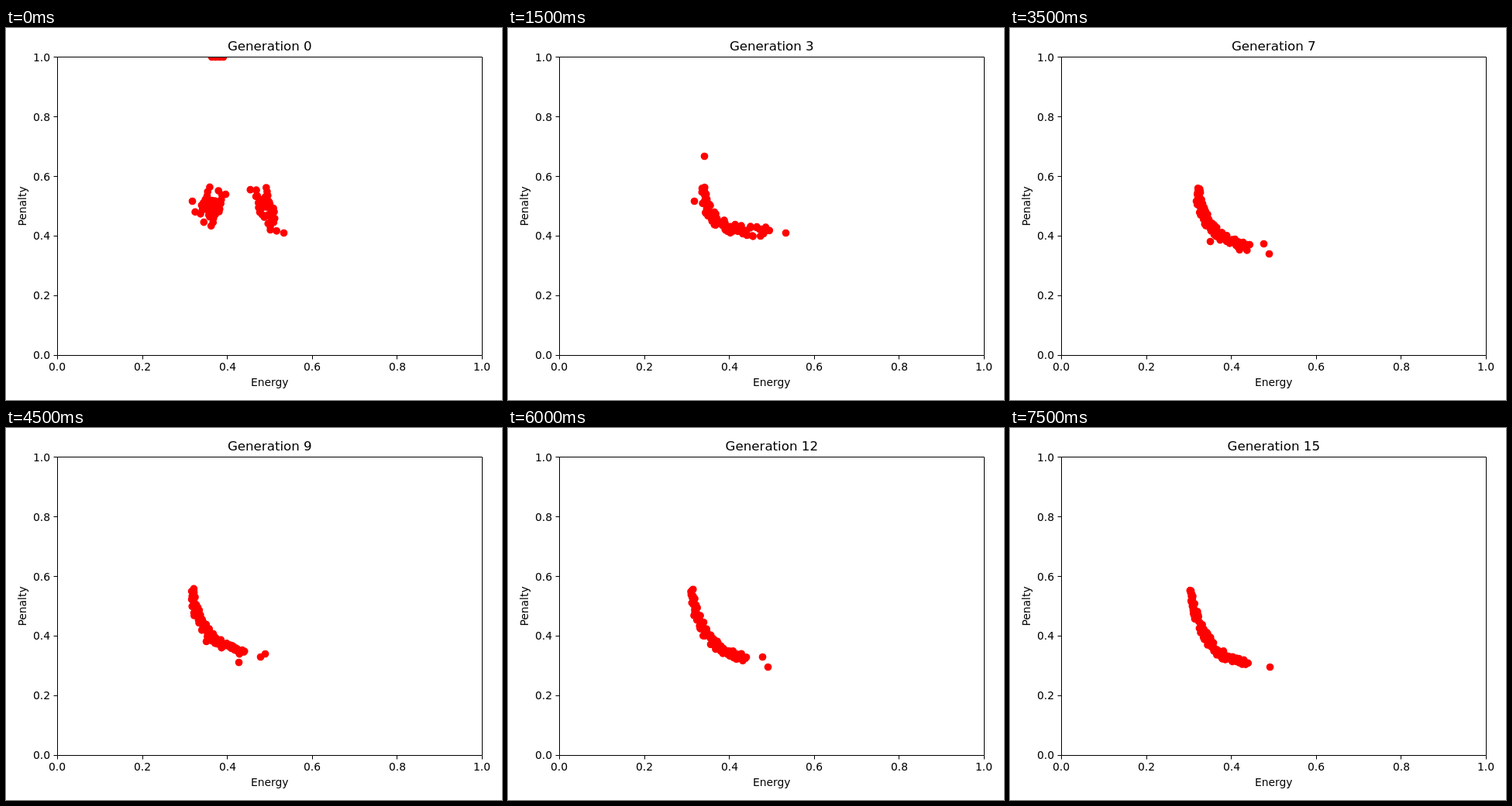
Animation of 640 by 480 pixels, one loop 8 s. Source, as an HTML page:

```html
<!DOCTYPE html>
<html lang="en">
<head>
<meta charset="utf-8">
<title>Generations</title>
<style>
  html, body { margin: 0; width: 100%; height: 100%; overflow: hidden; background: #fff; }
  svg { display: block; width: 640px; height: 480px; }
  text { font: 13.89px "DejaVu Sans", sans-serif; text-anchor: middle; fill: #000; }
  #title { font-size: 16.67px; }
  .left text { text-anchor: end; }
  #dots { fill: none; stroke: #f00; stroke-width: 9.7; stroke-linecap: round; }
  #axes { fill: none; stroke: #000; stroke-width: 1; }
</style>
</head>
<body>
<svg viewBox="0 0 640 480">
  <clipPath id="plot"><rect x="66.5" y="37.5" width="548" height="385"/></clipPath>
  <g clip-path="url(#plot)"><path id="dots" transform="translate(.5 .5)"/></g>
  <path id="axes"/>
  <g id="xTicks"></g>
  <g id="yTicks" class="left"></g>
  <text id="title" x="340.3" y="29"></text>
  <text x="340.3" y="462">Energy</text>
  <text transform="translate(26 230) rotate(-90)">Penalty</text>
</svg>
<script>
const STEP = 500, COUNT = 16;
const byId = id => document.getElementById(id);
const lerp = (a, b, k) => a + (b - a) * k;
const mix = (p, q, k) => [lerp(p[0], q[0], k), lerp(p[1], q[1], k)];

function random(seed) {
  let s = seed * 7919 + 17;
  return () => (s = (s * 16807) % 2147483647) / 2147483647;
}

function label(parent, x, y, value) {
  const el = document.createElementNS("http://www.w3.org/2000/svg", "text");
  el.setAttribute("x", Math.round(x));
  el.setAttribute("y", Math.round(y));
  el.textContent = value.toFixed(1);
  byId(parent).append(el);
}

function drawAxes() {
  let d = "M66.5 37.5H614.5V422.5H66.5Z";
  for (let i = 0; i <= 5; i++) {
    const x = 66.4 + 109.6 * i, y = 37.5 + 76.9 * i;
    d += `M${Math.floor(x) + .5} 422.5v5M66.5 ${Math.floor(y) + .5}h-5`;
    label("xTicks", x, 442, i / 5);
    label("yTicks", 57, y + 5.2, 1 - i / 5);
  }
  byId("axes").setAttribute("d", d);
}

// Normally distributed cluster; tilt shears it sideways.
function cluster(cx, cy, tilt, n) {
  const rnd = random(cx);
  return Array.from({ length: n }, (_, i) => {
    const r = Math.sqrt(-2 * Math.log(1 - (i + .5) / n)), a = 2 * Math.PI * rnd();
    const dy = 12 * r * Math.sin(a);
    return [cx + 7.5 * r * Math.cos(a) + tilt * dy, cy + dy];
  });
}

// The front is a quadratic curve (top, knee, end) that moves between these keys.
const fronts = [
  { gen: 1, curve: [[257, 205], [255, 257], [350, 251]] },
  { gen: 3, curve: [[252, 205], [250, 268], [338, 262]] },
  { gen: 7, curve: [[243, 206], [241, 268], [309, 284]] },
  { gen: 15, curve: [[233, 208], [245, 297], [307, 304]] }
];

function curveAt(gen) {
  const i = Math.max(1, fronts.findIndex(f => f.gen >= gen));
  const a = fronts[i - 1], b = fronts[i];
  const k = (gen - a.gen) / (b.gen - a.gen);
  return a.curve.map((p, j) => mix(p, b.curve[j], k));
}

function front(gen, n = 84) {
  const [top, knee, end] = curveAt(gen), rnd = random(gen);
  const spread = 4.5 + 4 * Math.exp(-gen / 5);
  return Array.from({ length: n }, (_, i) => {
    const u = ((i + rnd()) / n) ** 1.15;
    const p = mix(top, knee, u), q = mix(knee, end, u);
    const [x, y] = mix(p, q, u);
    const dx = q[0] - p[0], dy = q[1] - p[1];
    const width = spread * (.3 + .7 * Math.min(1, 3 * u));
    const off = width * (2 * rnd() - 1) / Math.hypot(dx, dy);
    return [x - dy * off, y + dx * off];
  });
}

// Lone points that outlive several generations
const loners = [
  { at: [240, 223], from: 0, to: 8 },
  { at: [358, 264], from: 0, to: 6 },
  { at: [253, 165], from: 2, to: 3 },
  { at: [334, 291], from: 4, to: 10 },
  { at: [327, 278], from: 5, to: 8 },
  { at: [258, 275], from: 5, to: 9 },
  { at: [328, 295], from: 9, to: 13 },
  { at: [300, 302], from: 9, to: 11 },
  { at: [335, 308], from: 12, to: 15 }
];

function population(gen) {
  const points = loners.filter(l => gen >= l.from && gen <= l.to).map(l => l.at);
  if (gen > 0) return points.concat(front(gen));
  for (let i = 0; i < 4; i++) points.push([265 + 5 * i, 37]);
  return points.concat(cluster(263, 231, 0, 48), cluster(337, 231, .2, 48));
}

const paths = Array.from({ length: COUNT }, (_, gen) =>
  population(gen).map(([x, y]) => `M${x.toFixed(1)} ${y.toFixed(1)}h.01`).join(""));

let shown = -1;
const start = performance.now();

function tick() {
  const gen = Math.floor((performance.now() - start) / STEP) % COUNT;
  if (gen !== shown) {
    shown = gen;
    byId("dots").setAttribute("d", paths[gen]);
    byId("title").textContent = `Generation ${gen}`;
  }
  requestAnimationFrame(tick);
}

drawAxes();
tick();
</script>
</body>
</html>
```
